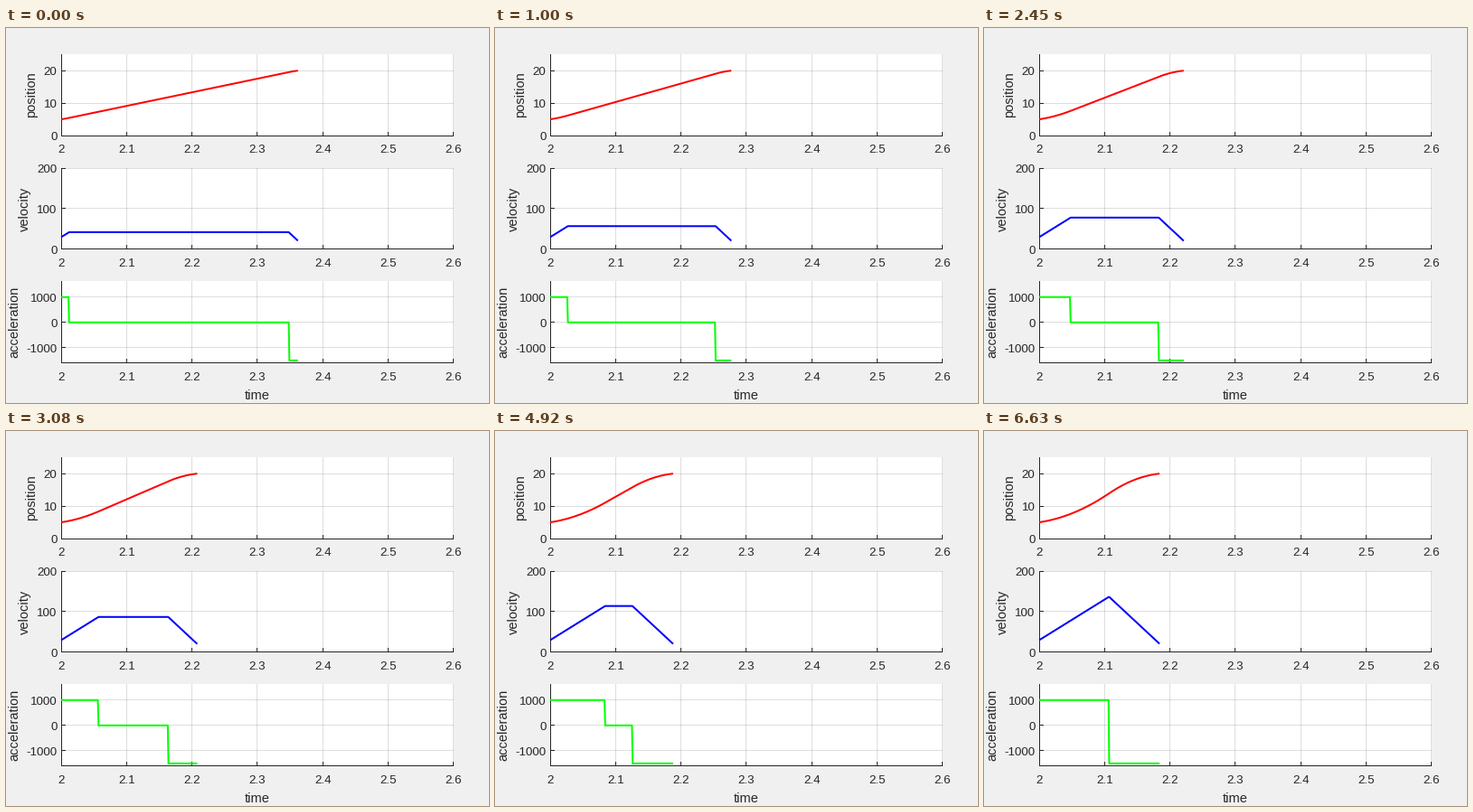
These frames come from a looping animation (534x415 px, 7720 ms). A matplotlib script:

```python
import math

import numpy as np
import matplotlib.pyplot as plt
from matplotlib.animation import FuncAnimation
from matplotlib.collections import LineCollection
from matplotlib.patches import Rectangle

W, H, DPI = 534, 415, 100
LOOP, STEP = 7720, 20
PT = 72 / DPI                      # points per pixel
INK, BACK = "#262626", "#f0f0f0"
LEFT, RIGHT = 61.1, 494.7
BOTTOM, PITCH, HEIGHT = 119, 125.85, 89.8   # panel stack
TICK = 4

# motion limits: start and end position, start and end speed, rates
P0, P1, V0, V1, ACC, DEC = 5, 20, 30, 20, 1000, 1500
V_PEAK = math.sqrt((P1 - P0 + V0**2 / (2 * ACC) + V1**2 / (2 * DEC))
                   / (1 / (2 * ACC) + 1 / (2 * DEC)))

# moments at which the speed limit rises, in ms
UNIT = 76.8
RISES = UNIT * np.array([8 * i // 3 for i in range(28)]
                        + [75, 78, 80, 82, 86.2])


def profile(limit):
    """Sampled trapezoidal motion with the given top speed."""
    v = min(limit, V_PEAK)
    ta, td = (v - V0) / ACC, (v - V1) / DEC
    da, dd = (v + V0) / 2 * ta, (v + V1) / 2 * td
    tb = ta + (P1 - P0 - da - dd) / v
    t = np.arange(int((tb + td) * 1000) + 1) / 1000
    up, down = np.minimum(t, ta), np.maximum(t - tb, 0)
    flat = np.clip(t - ta, 0, tb - ta)
    pos = (P0 + V0 * up + ACC * up**2 / 2 + v * flat
           + v * down - DEC * down**2 / 2)
    vel = V0 + ACC * up - DEC * down
    acc = np.where(t < ta, ACC, np.where(t <= tb, 0, -DEC))
    return t, (pos, vel, acc)


def to_x(t):
    return LEFT + t / 0.6 * (RIGHT - LEFT)


class Panel:
    def __init__(self, row, low, high, ticks, name, name_x, color):
        self.bottom, self.low = BOTTOM + row * PITCH, low
        self.scale = HEIGHT / (high - low)
        xs = [to_x(i / 10) for i in range(7)]
        ys = [self.to_y(v) for v in ticks]
        self.draw_frame(xs, ys)
        for i, x in enumerate(xs):
            label(x, self.bottom + 19, f"{2 + i / 10:g}")
        for v, y in zip(ticks, ys):
            label(56.5, y + 5.25, str(v), ha="right")
        label(name_x, self.bottom - HEIGHT / 2, name, 14.67, rotation=90,
              rotation_mode="anchor")
        self.line, = ax.plot([], [], color=color, lw=2 * PT, zorder=3,
                             solid_capstyle="butt")

    def draw_frame(self, xs, ys):
        """White box, grid, axes and ticks on whole pixels."""
        xs, ys = [math.floor(x) for x in xs], [math.floor(y) for y in ys]
        left, right = xs[0], xs[-1]
        top, bottom = math.floor(self.bottom - HEIGHT), math.floor(self.bottom)
        ax.add_patch(Rectangle((left, top), right + 1 - left, bottom - top,
                               fc="white", lw=0, zorder=0))
        segments([((x, top), (x, bottom)) for x in xs]
                 + [((left, y), (right, y)) for y in ys], 1, alpha=0.15)
        segments([((left, top), (left, bottom)),
                  ((left, bottom), (right, bottom))]
                 + [((x, bottom), (x, bottom - TICK)) for x in xs]
                 + [((left, y), (left + TICK, y)) for y in ys], 2)

    def to_y(self, v):
        return self.bottom - (v - self.low) * self.scale

    def show(self, t, values):
        self.line.set_data(to_x(t), self.to_y(values))


def segments(parts, z, **kw):
    ax.add_collection(LineCollection(parts, colors=INK, linewidths=PT,
                                     capstyle="projecting", zorder=z, **kw),
                      autolim=False)


def label(x, y, s, px=13.33, ha="center", **kw):
    ax.text(x, y, s, fontsize=px * PT, color=INK, ha=ha, va="baseline",
            family="Liberation Sans", **kw)


fig = plt.figure(figsize=(W / DPI, H / DPI), dpi=DPI, facecolor=BACK)
ax = fig.add_axes([0, 0, 1, 1])
ax.set(xlim=(0, W), ylim=(H, 0))
ax.axis("off")

panels = [
    Panel(0, 0, 25, (0, 10, 20), "position", 32, "#ff0000"),
    Panel(1, 0, 200, (0, 100, 200), "velocity", 25, "#0000ff"),
    Panel(2, -1600, 1600, (-1000, 0, 1000), "acceleration", 13.5, "#00ff00"),
]
label((LEFT + RIGHT) / 2, 410.5, "time", 14.67)


def update(k):
    rise = np.searchsorted(RISES, k * STEP + STEP - 1, side="right") - 1
    t, curves = profile(42 + 3 * rise)
    for panel, values in zip(panels, curves):
        panel.show(t, values)
    return [p.line for p in panels]


anim = FuncAnimation(fig, update, frames=LOOP // STEP, interval=STEP,
                     repeat=True)
plt.show()
```
